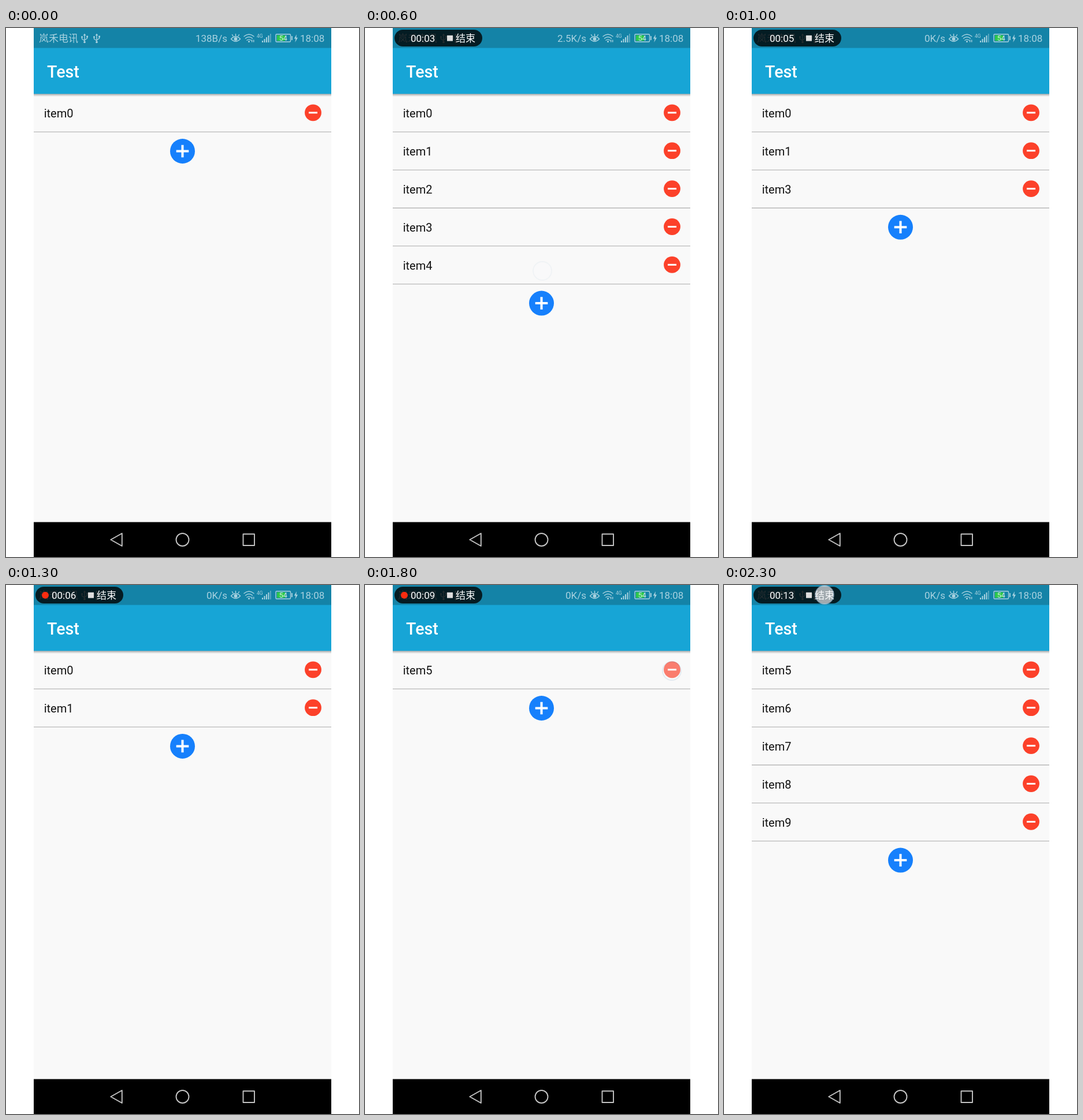
Animation, 611 px wide and 917 px high, one loop 2400 ms. Source, as an HTML page:

```html
<!DOCTYPE html>
<html lang="zh-CN">
<head>
<meta charset="utf-8">
<title>Test</title>
<style>
  html, body { margin: 0; width: 100%; height: 100%; overflow: hidden; background: #fff; }
  svg { display: block; width: 611px; height: 917px; }
  text { font-family: Roboto, "Noto Sans CJK SC", "Noto Sans CJK", sans-serif; }
  .status { font-size: 17px; fill: #a9d2e0; }
  .icon { fill: none; stroke: #a9d2e0; stroke-width: 1.4; stroke-linecap: round; }
  .solid { fill: #a9d2e0; }
  .title { font-size: 28.6px; font-weight: 500; fill: #fff; }
  .item { font-size: 20px; fill: #111; }
  .pill text { font-size: 17px; fill: #fff; }
  .nav { fill: none; stroke: #c4c4c4; stroke-width: 1.9; stroke-linejoin: round; }
</style>
</head>
<body>
<svg viewBox="0 0 611 917">
  <defs>
    <linearGradient id="shade" x2="0" y2="1">
      <stop stop-color="#000" stop-opacity=".32"/>
      <stop offset="1" stop-color="#000" stop-opacity="0"/>
    </linearGradient>
    <g id="usb">
      <path class="icon" d="M0-6V6M-4.5-2V1L0 4M4.5-3V0L0 3"/>
      <path class="solid" d="M-2.4-5 0-8.500 2.400-5Z"/>
      <circle class="solid" cy="6.500" r="1.800"/>
      <circle class="solid" cx="-4.500" cy="-2.500" r="1.500"/>
      <path class="solid" d="M3.200-4.500h2.800v2.800h-2.800Z"/>
    </g>
  </defs>

  <rect x="48" width="515" height="917" fill="#f9f9f9"/>
  <rect x="48" y="114" width="515" height="5" fill="url(#shade)"/>
  <rect x="48" width="515" height="35" fill="#1483a7"/>
  <rect x="48" y="34.600" width="515" height="79.600" fill="#17a5d6"/>
  <text class="title" x="71" y="85.500">Test</text>

  <text class="status" x="57" y="24">岚禾电讯</text>
  <use href="#usb" x="136" y="18"/>
  <use href="#usb" x="157" y="18"/>
  <text class="status" id="speed" x="383" y="24" text-anchor="end"></text>

  <path class="icon" d="M389.500 19Q397.500 10.500 405.500 19Q397.500 27.500 389.500 19ZM397.500 10.500V13.500M391.500 11.500 393 14M403.500 11.500 402 14"/>
  <circle class="solid" cx="397.500" cy="19" r="3"/>
  <path class="icon" d="M412 14.500Q420.500 7.500 429 14.500M414.500 18Q420.500 13 426.500 18M417 21.300Q420.500 18.500 424 21.300" stroke-width="1.700"/>
  <circle class="solid" cx="420.500" cy="23.500" r="1.500"/>
  <path class="solid" d="M425 20.500h1.400v4h-1.400ZM428 20.500h1.400v4h-1.400Z"/>
  <text class="status" x="434" y="17" style="font-size:8.500px">4G</text>
  <path class="solid" d="M443 22h2v3h-2ZM446.500 19h2v6h-2ZM450 16h2v9h-2ZM453.500 13h2v12h-2Z"/>
  <path class="solid" d="M457 10h1.800v15h-1.800Z" opacity=".5"/>
  <rect class="icon" x="467" y="10.700" width="25.500" height="13.300" rx="1.500" stroke-width="1.200"/>
  <rect x="469" y="12.500" width="14" height="9.700" fill="#2fc84c"/>
  <rect class="solid" x="494" y="14" width="1.800" height="7"/>
  <text x="479.800" y="22" text-anchor="middle" font-size="12.500" fill="#d6f2e0">54</text>
  <path class="solid" d="M503 11 498.800 18.500H501.500L500.300 25 505 16.800H502.300Z"/>
  <text class="status" x="509" y="24">18:08</text>

  <g class="pill" id="pill">
    <rect x="51" y="3" width="152" height="29" rx="14.500" fill="#000" fill-opacity=".79"/>
    <circle id="dot" cx="68" cy="17.700" r="6" fill="#fb2c10"/>
    <text id="clock" x="79" y="24"></text>
    <rect x="142" y="12.800" width="10" height="9.800" fill="#dedede"/>
    <text x="157" y="24">结束</text>
  </g>

  <g id="list"></g>

  <g id="add">
    <circle cx="305.500" r="21.500" fill="#1680fc"/>
    <path d="M294.700 0H316.300M305.500-10.800V10.800" stroke="#fff" stroke-width="4"/>
  </g>

  <g id="touch">
    <circle r="16" fill="#f6f8fa" fill-opacity=".65" stroke="#9fbdd6" stroke-opacity=".5" stroke-width="1.800"/>
  </g>

  <rect x="48" y="856.500" width="515" height="60.500" fill="#000"/>
  <path class="nav" d="M181.300 887 200.800 876V898ZM410.500 877.300H430V897H410.500Z"/>
  <circle class="nav" cx="305.500" cy="887" r="11"/>
</svg>
<script>
  const STEP = 100, PITCH = 65.9, MAX_ROWS = 5;
  const $ = id => document.getElementById(id);

  // Each step: item digits, then an optional touch as x, y, opacity.
  const steps = [
    ["0"], ["0"], ["0", 307, 221, .9],
    ["01", 307, 287, .95], ["012", 307, 353, .9], ["0123", 307, 421, .9],
    ["01234", 307, 421, .2], ["01234", 531, 281, .8], ["0134", 531, 281, .5],
    ["0134", 531, 345, .8], ["013"], ["013", 531, 281, .8],
    ["01", 531, 281, .3], ["01"], ["01", 531, 215, .8],
    ["0", 531, 215, .3], ["0"], ["05", 307, 221, .5],
    ["5", 531, 149, .5], ["56", 331, 271, .95], ["567", 331, 271, .8],
    ["5678", 331, 345, .9], ["56789", 331, 411, .4], ["56789", 174, 17, 1]
  ];

  const rows = Array.from({ length: MAX_ROWS }, (_, i) => {
    const row = document.createElementNS("http://www.w3.org/2000/svg", "g");
    row.setAttribute("transform", `translate(0 ${i * PITCH})`);
    row.innerHTML = `<text class="item" x="65.700" y="155"></text>
      <circle cx="531.500" cy="146.800" r="14.400" fill="#fc412a"/>
      <path d="M524 146.800H539" stroke="#fff" stroke-width="3"/>
      <path d="M48 180.200H563" stroke="#b9b9b9" stroke-width="1.300"/>`;
    $("list").append(row);
    return row;
  });

  const show = (el, on) => { el.style.display = on ? "" : "none"; };

  function draw(k) {
    const [items, x, y, alpha] = steps[k];
    rows.forEach((row, i) => {
      show(row, i < items.length);
      row.firstChild.textContent = "item" + (items[i] ?? "");
    });
    $("add").setAttribute("transform", `translate(0 ${147.6 + items.length * PITCH})`);

    show($("touch"), alpha);
    if (alpha) {
      $("touch").setAttribute("transform", `translate(${x} ${y})`);
      $("touch").setAttribute("opacity", alpha);
    }

    const elapsed = k * .52;
    const seconds = k === steps.length - 1 ? 13 : Math.floor(elapsed);
    show($("pill"), k > 0);
    show($("dot"), elapsed % 1 > .3 && seconds < 13);
    $("clock").textContent = "00:" + String(seconds).padStart(2, "0");
    $("speed").textContent = k < 3 ? "138B/s" : k < 9 ? "2.5K/s" : "0K/s";
  }

  let last = -1;
  function tick() {
    const k = Math.floor(performance.now() / STEP) % steps.length;
    if (k !== last) draw(last = k);
    requestAnimationFrame(tick);
  }
  tick();
</script>
</body>
</html>
```
